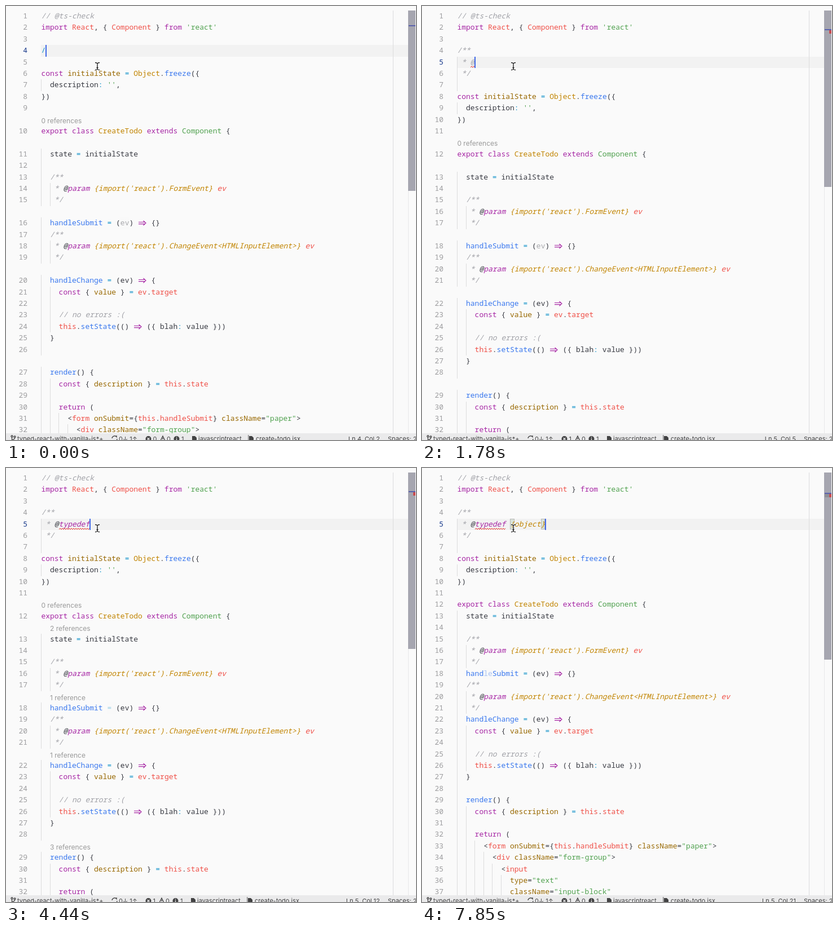
These frames come from a looping animation (727 by 770 pixels, 7990 ms). An HTML page:

```html
<!DOCTYPE html>
<html lang="en">
<head>
<meta charset="utf-8">
<title>Typing a typedef</title>
<style>
html, body { margin: 0; width: 100%; height: 100%; overflow: hidden; background: #fafafa; }
#stage { position: relative; width: 727px; height: 770px; overflow: hidden; }
#stage div, #stage svg.abs { position: absolute; }
#editor { inset: 0 0 12px 0; overflow: hidden; font: 13px/19.2px "Noto Sans Mono", monospace; color: #383a42; white-space: pre; }
.num { left: 0; width: 38px; text-align: right; color: #9d9d9f; }
.num.now { color: #17388a; font-weight: 500; }
.code { left: 62.4px; }
.guide { width: 1px; height: 20.4px; background: #dcdcdd; }
.band { left: 62px; width: 651px; height: 20.4px; background: #f2f2f2; }
.lens { font: 12px/20.4px Inter, sans-serif; color: #999; }
.caret { width: 2px; height: 20.4px; background: #4169e8; }
.veil { width: 15.6px; height: 20.4px; background: #fafafa; opacity: .58; }
.brace { width: 7.8px; height: 19.4px; box-sizing: border-box; border: 1px solid #b9b9b9; background: rgba(0, 100, 0, .1); }
.pop { width: 399px; box-sizing: border-box; border: 1px solid #d6d6d7; background: #eaeaeb; }
.item { left: 0; right: 0; height: 20.4px; }
.item.first { background: #fafafa; }
.item svg { position: absolute; left: 5px; top: 4px; }
.item span { position: absolute; left: 23px; }
.item b { color: #111; }
.item i { position: absolute; right: 9px; font-style: normal; color: #777; }
.arrow { width: 15.6px; height: 10px; vertical-align: -1px; }
.k { color: #a626a4 } .r { color: #ef5048 } .g { color: #50a14f } .b { color: #3a78ee }
.o { color: #0f90c8 } .y { color: #c18401 } .w { color: #986801 }
.c, .K, .Y, .R, .D { font-style: italic }
.c { color: #a0a1a7 } .K { color: #a626a4 } .Y { color: #c18401 } .R { color: #ef5048 }
#bar { left: 0; right: 0; top: 758px; height: 12px; overflow: hidden; background: #eaeaeb; color: #424243; font: 11px/14px Inter, sans-serif; white-space: pre; }
#bar div { top: 3px; }
#bar svg { position: absolute; left: 0; top: 0; }
</style>
</head>
<body>
<div id="stage"><div id="editor"></div><div id="bar"></div>
<svg class="abs" style="left:155px;top:97px" width="14" height="20" fill="none">
<path d="M3 3.500q3 0 4 1.500Q8 3.500 11 3.500M7 4.500v11.500M3 16.500q3 0 4-1.500Q8 16.500 11 16.500" stroke="#fff" stroke-width="3"/>
<path d="M3 3.500q3 0 4 1.500Q8 3.500 11 3.500M7 4.500v11.500M3 16.500q3 0 4-1.500Q8 16.500 11 16.500M5.500 12.500h3" stroke="#111" stroke-width="1.300"/></svg>
</div>
<script>
const LOOP = 7990, ROW = 20.4, CH = 7.8, X0 = 62.4, Y0 = 8;

// "~" encloses a token whose first letter is its class; "lens|code" puts a lens above a line
const HEAD = ['~c// @ts-check~', "~kimport~ ~rReact~, { ~rComponent~ } ~kfrom~ ~g'react'~", ''];
const param = type => ['  ~c/**~', `   ~c* ~~D@~~Kparam~ ~Y{import('react').${type}}~ ~Rev~`, '   ~c*/~'];
const TAIL = [
  '',
  '~kconst~ ~winitialState~ ~o=~ ~yObject~.~bfreeze~({',
  "  description~o:~ ~g''~,",
  '})',
  '',
  '0 references|~kexport class~ ~yCreateTodo~ ~kextends~ ~gComponent~ {',
  '2 references|  state ~o=~ initialState',
  '',
  ...param('FormEvent'),
  '1 reference|  ~bhandleSubmit~ ~o=~ (ev) ~a=>~ {}',
  ...param('ChangeEvent<HTMLInputElement>'),
  '1 reference|  ~bhandleChange~ ~o=~ (ev) ~a=>~ {',
  '    ~kconst~ { ~wvalue~ } ~o=~ ~rev~.~rtarget~',
  '',
  '    ~c// no errors :(~',
  '    ~rthis~.~bsetState~(() ~a=>~ ({ blah~o:~ value }))',
  '  }',
  '',
  '3 references|  ~brender~() {',
  '    ~kconst~ { ~wdescription~ } ~o=~ ~rthis~.~rstate~',
  '',
  '    ~kreturn~ (',
  '      <~rform~ ~wonSubmit~={~rthis~.~rhandleSubmit~} ~wclassName~=~g"paper"~>',
  '        <~rdiv~ ~wclassName~=~g"form-group"~>',
  '          <~rinput~',
  '            ~wtype~=~g"text"~',
  '            ~wclassName~=~g"input-block"~'
];

const TAGS = ['template', 'this', 'throws', 'todo', 'tutorial', 'type', 'typedef', 'thenc', 'trycatch'];
const SNIPPETS = ['thenc', 'trycatch'];

const block = mid => ['~c/**~', '~c * ~' + mid, '~c */~'];
const plainTag = s => ({ doc: block(`~c@${s}~`), col: 5 + s.length, on: 1 });
const tag = (s, rest = '') => ({ doc: block(`~D@~~K${s}~${rest}`), on: 1 });
const typed = s => ({ ...tag('typedef', ` ~Y{${s}}~`), col: 14 + s.length, close: 13 + s.length });

// each step overrides what came before it
const STEPS = [
  [0, { doc: ['~o/~'], ln: 4, col: 2, on: 1, err: 0, wave: null, fade: 0, dark: 0, flat: 0, open: 0, unused: 18, pop: null, match: 0, thumb: 320, mark: 34 }],
  [450, { doc: ['~c/*~'], col: 3, open: 1 }],
  [590, { doc: ['~c/** */~'], col: 4, open: 0 }],
  [740, { doc: block(''), ln: 5, col: 4, err: 1, wave: [4, 0, 1], thumb: 313, mark: 41 }],
  [1190, { on: 0, err: 0, wave: null }],
  [1630, plainTag('')],
  [1780, { err: 1, wave: [5, 3, 4] }],
  [2080, { on: 0 }],
  [2230, { err: 0, wave: null }],
  [2670, { ...plainTag('t'), pop: 't', fade: .05, dark: 1 }],
  [2820, { fade: .3 }],
  [2960, { ...plainTag('ty'), pop: 'ty', fade: .55, dark: 0 }],
  [3110, { fade: .8 }],
  [3260, { ...plainTag('typ'), pop: 'typ', fade: 1 }],
  [3560, { ...tag('type'), col: 9, pop: 'type', err: 1, wave: [5, 4, 8] }],
  [3710, { ...plainTag('typed'), pop: 'typed', wave: [5, 4, 9] }],
  [3850, { ...plainTag('typede'), pop: 'typede', wave: [5, 4, 10] }],
  [4140, { ...tag('typedef'), col: 12, pop: null, wave: [5, 4, 11] }],
  [4290, { unused: 15 }],
  [4580, { ...tag('typedef', ' '), col: 13, flat: 1, thumb: 332, mark: 44 }],
  [5030, { on: 0 }],
  [5480, { on: 1 }],
  [5770, typed('')],
  [5920, { match: 1 }],
  [6220, { on: 0, unused: 12 }],
  [6820, typed('o')],
  [6970, typed('ob')],
  [7110, typed('obj')],
  [7410, { ...typed('obje'), match: 0 }],
  [7560, typed('objec')],
  [7700, typed('object')],
  [7850, { ...typed('object'), col: 21, match: 1, unused: 6 }]
];
let last = {};
const STATES = STEPS.map(([at, change]) => last = { ...last, ...change, at });

const ARROW = '<svg class="arrow" viewBox="0 0 15.6 10" fill="none" stroke="#a626a4" stroke-width="1.2"><path d="M1 3.5h11M1 6.7h11M9.5 1l4.5 4.1-4.5 4.1"/></svg>';
const WORD_ICON = '<svg width="15" height="13" stroke="#555" stroke-width="1.2"><path d="M1 1.5h8M1 4.5h4M7 4.5h7M1 7.5h7M10 7.5h4M1 10.5h4M7 10.5h6"/></svg>';
const SNIPPET_ICON = '<svg width="15" height="13" fill="none" stroke="#555" stroke-width="1.2"><path d="M2 11V1h11v10"/><path d="M2 11.5h11" stroke-dasharray="2 1.5"/></svg>';

const esc = s => s.replace(/&/g, '&amp;').replace(/</g, '&lt;');
const plain = s => s.split('~').map((p, i) => i % 2 ? p.slice(1) : p).join('');
const paint = s => s.split('~').map((p, i) =>
  !(i % 2) ? esc(p) : p[0] === 'a' ? ARROW : `<span class="${p[0]}">${esc(p.slice(1))}</span>`).join('');
const box = (cls, style, inner = '') => `<div class="${cls}" style="${style}">${inner}</div>`;
const at = (x, y) => `left:${x.toFixed(1)}px;top:${y.toFixed(1)}px;`;
const colX = c => X0 + c * CH;

function guideCount(indents, i) {
  if (indents[i] >= 0) return Math.ceil(indents[i] / 2);
  const above = indents.slice(0, i).reverse().find(n => n >= 0) ?? 0;
  const below = indents.slice(i).find(n => n >= 0) ?? 0;
  return above === below ? Math.ceil(below / 2) : 1 + Math.floor(Math.min(above, below) / 2);
}

function squiggle(y, a, b) {
  const w = (b - a) * CH;
  let d = 'M0 3.2';
  for (let x = 2, up = 1; x <= w + 1; x += 2, up = !up) d += `L${x} ${up ? .8 : 3.2}`;
  return `<svg class="abs" style="${at(colX(a), y + 16.6)}" width="${w}" height="4" fill="none" stroke="#e5251c" stroke-width=".9"><path d="${d}"/></svg>`;
}

function popup(s, y) {
  const items = TAGS.filter(w => w.startsWith(s.pop));
  const rows = items.map((w, i) => box('item' + (i ? '' : ' first'), `top:${i * ROW}px`,
    (SNIPPETS.includes(w) ? SNIPPET_ICON : WORD_ICON) +
    `<span><b>${s.pop}</b>${w.slice(s.pop.length)}</span>` + (i ? '' : `<i>${w}</i>`)));
  return box('pop', at(colX(s.col - 1) - .5, y + ROW - .4) + `height:${items.length * ROW + 1}px`, rows.join(''));
}

function editor(s) {
  let rest = TAIL;
  if (s.open) {
    const end = TAIL.findIndex(l => l.includes('*/'));
    rest = TAIL.map((l, i) => {
      if (i > end) return l;
      const [code, lens] = l.split('|').reverse();
      return (lens ? lens + '|' : '') + `~c${plain(code)}~`;
    });
  }
  const lines = [...HEAD, ...s.doc, ...rest].map(l => l.split('|').reverse());
  const indents = lines.map(([code]) => plain(code).search(/\S/));
  let row = 0, out = '', back = '', ys = [];
  lines.forEach(([code, lens], i) => {
    if (lens && !s.flat) {
      const top = lens[0] === '0';
      const look = top ? (s.dark ? 'color:#777' : '') : `opacity:${s.fade}`;
      out += box('lens', at(colX(top ? 0 : 2), Y0 + row++ * ROW + 2) + look, lens);
    }
    const y = Y0 + row++ * ROW;
    ys.push(y);
    for (let g = 0; g < guideCount(indents, i); g++) out += box('guide', at(Math.floor(colX(g * 2)), y));
    out += box('num' + (i + 1 === s.ln ? ' now' : ''), `top:${y}px`, i + 1);
    out += box('code', `top:${y}px`, paint(code));
    if (code.includes('handleSubmit~ ~o')) out += box('veil', at(colX(s.unused), y));
  });
  const y = ys[s.ln - 1];
  back += box('band', `top:${y}px`);
  if (s.match) for (const c of [12, s.close]) back += box('brace', at(colX(c), y + .5));
  if (s.wave) out += squiggle(ys[s.wave[0] - 1], s.wave[1], s.wave[2]);
  if (s.on) out += box('caret', at(colX(s.col - 1) - .4, y));
  if (s.pop) out += popup(s, y);
  return back + out + rails(s);
}

function rails(s) {
  const bar = (x, y, w, h, c) => box('', `left:${x}px;top:${y}px;width:${w}px;height:${h}px;background:${c}`);
  const errY = s.wave && s.wave[0] === 4 ? s.mark - 7 : s.mark;
  return bar(686, 8, 1, 750, '#dcdcdd') + bar(713, 8, 1, 750, '#e8e8e9') +
    bar(713, 8, 13, s.thumb, '#a6a6b0') +
    (s.match ? bar(714, s.mark, 8, 8, '#8f8f99') : '') +
    (s.err ? bar(722, errY, 4, 8, '#c94c50') : '') +
    bar(714, s.mark, 12, 2, '#5a62ad');
}

function status(s) {
  const dx = s.err ? -2 : 0;
  const text = (x, t) => box('', `left:${x}px`, t);
  const file = x => `<path d="M${x} 5h5l3 3v7h-8z" fill="#424243" stroke="none"/>`;
  return `<svg width="727" height="12" fill="none" stroke="#424243" stroke-width="1.3">
    <circle cx="10.5" cy="5.5" r="1.5"/><circle cx="15.5" cy="6.5" r="1.5"/><path d="M10.5 7v6M15.5 8q0 3-5 4"/>
    <path d="M188 9a4.5 4.5 0 0 1 8-2.5v-2.5M197 10a4.5 4.5 0 0 1-8 2.5"/>
    <circle cx="252.5" cy="10" r="5" fill="#424243" stroke="none"/><path d="M250.5 8l4 4m0-4l-4 4" stroke="#eaeaeb"/>
    <g transform="translate(${dx})"><path d="M278 5l4.5 9h-9zM278 8v3"/>
    <circle cx="302.5" cy="10" r="5" fill="#424243" stroke="none"/><path d="M302.5 6.5v1.5M302.5 9v4" stroke="#eaeaeb"/>
    ${file(330)}${file(431)}</g></svg>` +
    text(20, 'typed-react-with-vanilla-js*+') + text(200, '0↓ 1↑') + text(260.5, s.err) +
    text(285 + dx, 0) + text(311 + dx, 1) + text(341 + dx, 'javascriptreact') + text(428 + dx, '|') +
    text(443 + dx, 'create-todo.jsx') +
    box('', 'right:64px', `Ln ${s.ln}, Col ${s.col}`) + text(677, 'Spaces: 2');
}

const editorEl = document.getElementById('editor'), barEl = document.getElementById('bar');
const start = performance.now();
let shown;
function tick() {
  const t = (performance.now() - start) % LOOP;
  const state = STATES.filter(s => s.at <= t).pop();
  if (state !== shown) {
    shown = state;
    editorEl.innerHTML = editor(state);
    barEl.innerHTML = status(state);
  }
  requestAnimationFrame(tick);
}
tick();
</script>
</body>
</html>
```
